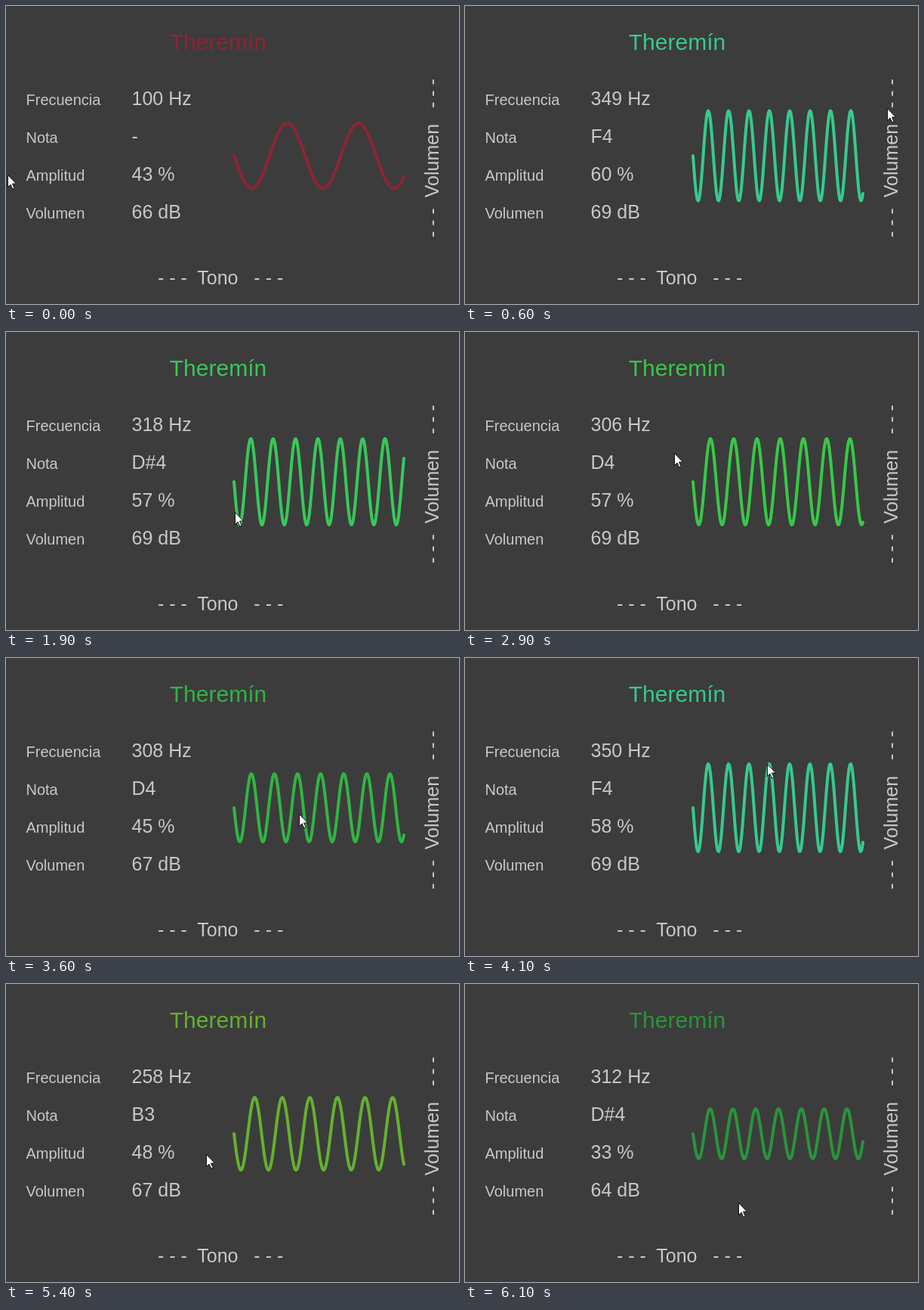
Write an HTML page that moves like this. It is 600 by 394 pixels and loops after 6.2 s.

```html
<!DOCTYPE html>
<html lang="es">
<head>
<meta charset="utf-8">
<title>Theremín</title>
<style>
  html, body { margin: 0; width: 100%; height: 100%; overflow: hidden; background: #3c3c3c; }
  svg { display: block; width: 600px; height: 394px; }
  text { font-family: "Liberation Sans", Arial, sans-serif; font-size: 25px; fill: #c8c8c8; white-space: pre; }
  .label { font-size: 20px; }
  #title { font-size: 30px; text-anchor: middle; }
  #wave { fill: none; stroke-width: 4; stroke-linecap: round; stroke-linejoin: round; }
</style>
</head>
<body>
<svg viewBox="0 0 600 394">
  <text id="title" x="281" y="58">Theremín</text>
  <text class="label" x="26.5" y="131">Frecuencia</text>
  <text class="label" x="26.5" y="181">Nota</text>
  <text class="label" x="26.5" y="231">Amplitud</text>
  <text class="label" x="26.5" y="281">Volumen</text>
  <text id="freq" x="166.5" y="131"></text>
  <text id="note" x="166.5" y="181"></text>
  <text id="amp" x="166.5" y="231"></text>
  <text id="vol" x="166.5" y="281"></text>
  <text x="201" y="368">- - -  Tono   - - -</text>
  <text transform="translate(572.5 306) rotate(-90)">- - -  Volumen   - - -</text>
  <path id="wave"/>
  <path id="cursor" d="M.5.5V16.5L4 13L6.8 19L9.2 18L6.5 12H11.5Z" fill="#fff" stroke="#111" stroke-width="1"/>
</svg>
<script>
const LOOP = 6200, STEP = 100;
const NOTES = ['C', 'C#', 'D', 'D#', 'E', 'F', 'F#', 'G', 'G#', 'A', 'A#', 'B'];
const LOWEST_NOTE = 130.8;

// time, cursor x, cursor y, frequency, amplitude, lightness
const KEYS = [
  [0, 2, 223, 100, 43, 35],
  [550, 540, 140, 330, 58, 49],
  [800, 510, 130, 405, 65, 53],
  [1200, 387, 154, 380, 64, 53],
  [1900, 303, 238, 318, 57, 50],
  [2400, 345, 205, 322, 50, 47],
  [2900, 277, 160, 306, 57, 50],
  [3200, 275, 215, 286, 52, 48],
  [3600, 388, 206, 308, 45, 45],
  [4100, 400, 140, 350, 58, 50],
  [4700, 207, 175, 237, 65, 52],
  [5400, 265, 225, 258, 48, 44],
  [6100, 362, 289, 312, 33, 37]
];

const el = id => document.getElementById(id);

function slope(i, c) {
  const a = KEYS[Math.max(i - 1, 0)], b = KEYS[Math.min(i + 1, KEYS.length - 1)];
  return (b[c] - a[c]) / (b[0] - a[0]);
}

// Hermite curve through the keys
function sample(t, c) {
  const next = KEYS.findIndex(k => k[0] > t);
  const i = next < 0 ? KEYS.length - 2 : next - 1;
  const a = KEYS[i], b = KEYS[i + 1], d = b[0] - a[0];
  const u = (t - a[0]) / d, v = 1 - u;
  return v * v * (1 + 2 * u) * a[c] + u * u * (3 - 2 * u) * b[c]
    + d * u * v * (v * slope(i, c) - u * slope(i + 1, c));
}

function noteName(freq) {
  if (freq < LOWEST_NOTE) return '-';
  const n = Math.floor(69 + 12 * Math.log2(freq / 440));
  return NOTES[n % 12] + (Math.floor(n / 12) - 1);
}

function wavePath(freq, amp) {
  const points = [];
  for (let x = 0; x <= 225; x++)
    points.push(`${302 + x} ${(198 + amp * Math.sin(x * freq / 1500)).toFixed(2)}`);
  return 'M' + points.join('L');
}

function draw(t) {
  const [x, y, freq, amp, light] = [1, 2, 3, 4, 5].map(c => sample(t, c));
  const color = `hsl(${0.65 * freq - 72}, 58%, ${light}%)`;
  el('title').style.fill = color;
  el('wave').style.stroke = color;
  el('wave').setAttribute('d', wavePath(freq, amp));
  el('cursor').setAttribute('transform', `translate(${Math.round(x)} ${Math.round(y)})`);
  el('freq').textContent = Math.round(freq) + ' Hz';
  el('note').textContent = noteName(freq);
  el('amp').textContent = Math.round(amp) + ' %';
  el('vol').textContent = Math.round(20 * Math.log10(amp) + 33.6) + ' dB';
}

function tick() {
  draw(Math.floor(performance.now() % LOOP / STEP) * STEP);
  requestAnimationFrame(tick);
}
tick();
</script>
</body>
</html>
```
